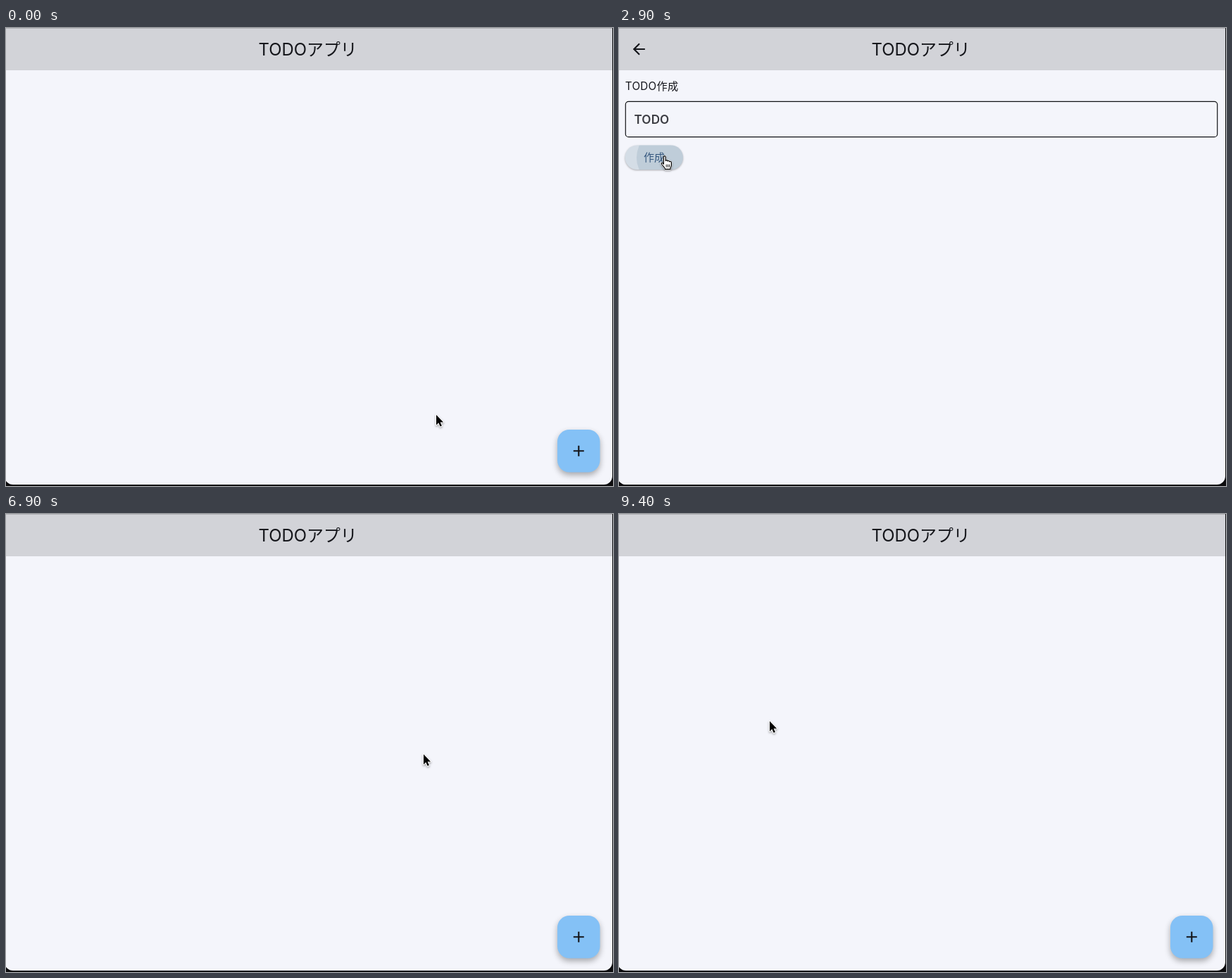
Write an HTML page with a canvas that moves like this. It is 862 px wide and 650 px high and loops after 10000 ms.

```html
<!DOCTYPE html>
<html lang="ja">
<head>
<meta charset="utf-8">
<title>TODOアプリ</title>
<style>
  html, body { margin: 0; width: 862px; height: 650px; overflow: hidden; background: #0c0c0e; }
  canvas { display: block; }
</style>
</head>
<body>
<canvas id="stage" width="862" height="650"></canvas>
<script>
const W = 862, H = 650, LOOP = 10000, STEP = 100;
const ctx = document.getElementById('stage').getContext('2d');
const FONT = 'Inter, "Noto Sans CJK JP", "Noto Sans CJK", sans-serif';
const BG = '#f4f5fb', BAR = '#d2d3d8', INK = '#15161b', ACCENT = '#36618e';

// x, y, width, height, corner radius
const FAB = [783, 570, 60.5, 60.5, 17];
const SUBMIT = [8.5, 166.5, 82.5, 34.5, 17.25];
const FIELD = [9.3, 104.3, 840.4, 50.4, 4.3];
const BACK = [9, 11, 38, 38, 19];

const ICON_BACK = new Path2D('M20 11H7.83l5.59-5.59L12 4l-8 8 8 8 1.41-1.41L7.83 13H20v-2z');
const ICON_PLUS = new Path2D('M19 13h-6v6h-2v-6H5v-2h6V5h2v6h6z');
const ARROW = new Path2D('M0 0V14.4L3.3 11.3L5.6 16.6L7.9 15.6L5.6 10.4H10.1Z');
const BEAM = new Path2D('M0 0Q4 0 4 3V15Q4 18 0 18M8 0Q4 0 4 3M8 18Q4 18 4 15');
const HAND = new Path2D('M4.4 12.2V2.2C4.4 .2 7.2 .2 7.2 2.2V7.3C8 6.2 9.9 6.6 10 7.9' +
  'C10.9 7 12.6 7.4 12.7 8.7C13.8 8 15.4 8.6 15.4 10V13.6C15.4 16 14 16.6 13.8 19.4H6.6' +
  'C6.4 17 3.4 15 1.6 12.2C.6 10.4 2.8 9.4 4.4 12.2Z');
const HAND_LINES = new Path2D('M8.2 12.6V16.6M10.4 12.6V16.6M12.6 12.6V16.6');

// pointer moves: start, end, x, y; it rests in between
const MOVES = [
  [0, 500, 818, 594], [900, 1100, 707, 566], [1100, 1300, 54, 210], [1400, 1600, 356, 301],
  [1600, 1900, 82, 190], [1900, 2700, 59, 181], [2900, 3400, 76, 132], [3400, 3600, 75, 160],
  [3700, 4100, 161, 87], [4700, 5300, 57, 167], [5800, 6500, 24, 28], [6500, 6900, 593, 341],
  [6900, 7500, 810, 595], [7650, 7800, 770, 583], [7800, 8000, 610, 480],
  [8100, 8700, 24, 28], [8800, 9400, 214, 294]
];
const CLICKS = [560, 2757, 5620, 7460];
const OPENS = [706, 7606], CLOSES = [6505, 8805];
const FOCUS = [3400, 5000], TYPING = 4400;

const clamp = v => Math.max(0, Math.min(1, v));
const lerp = (a, b, k) => a + (b - a) * k;
const hit = ([px, py], [x, y, w, h]) => px >= x && px <= x + w && py >= y && py <= y + h;

function bezier(a, b, c, d, s) {
  const r = 1 - s;
  return r * r * r * a + 3 * r * r * s * b + 3 * r * s * s * c + s * s * s * d;
}

// fast start, long settle: two cubics joined at (0.198, 0.541)
function settle(x) {
  if (x <= 0 || x >= 1) return clamp(x);
  const [px, py] = x < 0.198
    ? [[0, 0.056, 0.108, 0.198], [0, 0.024, 0.3085, 0.541]]
    : [[0.198, 0.3655, 0.5465, 1], [0.541, 1, 0.989, 1]];
  let lo = 0, hi = 1;
  for (let i = 0; i < 24; i++) {
    const mid = (lo + hi) / 2;
    if (bezier(...px, mid) < x) lo = mid; else hi = mid;
  }
  return bezier(...py, lo);
}

// 0 = list page, 1 = editor page
function pageShown(t) {
  const sum = (starts, len) => starts.reduce((s, a) => s + settle((t - a) / len), 0);
  return sum(OPENS, 500) - sum(CLOSES, 390);
}

function pointerAt(t) {
  let pos = [611, 549];
  for (const [start, end, x, y] of MOVES) {
    const k = clamp((t - start) / (end - start));
    pos = [lerp(pos[0], x, k), lerp(pos[1], y, k)];
  }
  return pos;
}

function box(rect) {
  ctx.beginPath();
  ctx.roundRect(...rect);
}

function text(str, x, y, size, color, weight = 400, spacing = 0) {
  ctx.font = `${weight} ${size}px ${FONT}`;
  ctx.letterSpacing = spacing + 'px';
  ctx.fillStyle = color;
  ctx.fillText(str, x, y);
}

function icon(path, cx, cy) {
  ctx.save();
  ctx.translate(cx, cy);
  ctx.scale(1.0714, 1.0714);
  ctx.translate(-12, -12);
  ctx.fillStyle = INK;
  ctx.fill(path);
  ctx.restore();
}

function shadow(color, blur, dy) {
  ctx.shadowColor = color;
  ctx.shadowBlur = blur;
  ctx.shadowOffsetY = dy;
}

// raised button with click ripples clipped to its shape
function raised(t, rect, fill, ...shade) {
  ctx.save();
  box(rect);
  ctx.save();
  shadow(...shade);
  ctx.fillStyle = fill;
  ctx.fill();
  ctx.restore();
  ctx.clip();
  for (const click of CLICKS) {
    const age = t - click, at = pointerAt(click);
    if (age <= 0 || age > 600 || !hit(at, rect)) continue;
    ctx.fillStyle = `rgba(100,135,160,${0.19 * clamp((600 - age) / 300)})`;
    ctx.beginPath();
    ctx.arc(at[0] + 6, at[1] + 3, age * 0.28, 0, 7);
    ctx.fill();
  }
  ctx.restore();
}

function frame() {
  ctx.fillStyle = BG;
  ctx.fillRect(0, 0, W, H);
  ctx.fillStyle = BAR;
  ctx.fillRect(0, 0, W, 60);
  text('TODOアプリ', 358.5, 39, 23.9, INK);
}

function home(t, over) {
  frame();
  raised(t, FAB, over === FAB ? '#7bb6ea' : '#84c1f6', 'rgba(0,0,0,.32)', 8, 4);
  icon(ICON_PLUS, 813.3, 600.3);
}

function editor(t, over) {
  frame();
  if (over === BACK) {
    ctx.fillStyle = 'rgba(30,32,40,.09)';
    box(BACK);
    ctx.fill();
  }
  icon(ICON_BACK, 28.3, 30);
  text('TODO作成', 8.8, 87.5, 15.2, INK, 400, 0.3);

  const focus = t >= FOCUS[0] && t < FOCUS[1];
  ctx.strokeStyle = focus ? ACCENT : '#111216';
  ctx.lineWidth = focus ? 2.1 : 1.2;
  box(FIELD);
  ctx.stroke();

  const typed = t < OPENS[1] ? 'k'.repeat(2 * clamp(Math.floor((t - TYPING) / STEP + 1) / 2)) : '';
  if (typed) text(typed, 21.3, 136, 17.14, INK, 400, 0.5);
  else text('TODO', 21.5, 136, 17.14, '#3c3d43', 600, 0.1);
  if (focus) {
    ctx.fillStyle = ACCENT;
    ctx.fillRect(21.3 + typed.length * 10.2, 120, 2, 21);
  }
  raised(t, SUBMIT, over === SUBMIT ? '#d4dde6' : '#ecedf7', 'rgba(0,0,0,.3)', 2.5, 1);
  text('作成', 34.9, 189, 15, '#36587f', 500, 0.1);
}

function pointer([x, y], over) {
  ctx.save();
  ctx.translate(x, y);
  ctx.lineJoin = 'round';
  ctx.strokeStyle = '#000';
  ctx.lineWidth = 1.2;
  if (over === FIELD) {
    ctx.stroke(BEAM);
  } else {
    const shape = over ? HAND : ARROW;
    ctx.save();
    shadow('rgba(0,0,0,.35)', 3, 1.5);
    ctx.strokeStyle = '#fff';
    ctx.lineWidth = 2;
    ctx.stroke(shape);
    ctx.restore();
    ctx.fillStyle = over ? '#fff' : '#000';
    ctx.fill(shape);
    if (over) {
      ctx.stroke(HAND);
      ctx.lineWidth = 0.9;
      ctx.stroke(HAND_LINES);
    }
  }
  ctx.restore();
}

function draw(t) {
  const p = pageShown(t), pos = pointerAt(t);
  const targets = p < 0.01 ? [FAB] : p > 0.98 ? [SUBMIT, FIELD, BACK] : [];
  const over = targets.find(r => hit(pos, r));

  ctx.fillStyle = '#0c0c0e';
  ctx.fillRect(0, 0, W, H);
  ctx.save();
  box([-2, -20, 863, 668, 12]);
  ctx.clip();

  // the first page trails at a third of the speed
  ctx.save();
  ctx.translate(-W / 3 * p, 0);
  home(t, over);
  ctx.restore();

  if (p > 0) {
    ctx.save();
    ctx.translate(W * (1 - p), 0);
    const edge = ctx.createLinearGradient(-43, 0, 0, 0);
    edge.addColorStop(0, 'rgba(0,60,60,0)');
    edge.addColorStop(1, 'rgba(0,60,60,.022)');
    ctx.fillStyle = edge;
    ctx.fillRect(-43, 0, 43, H);
    editor(t, over);
    ctx.restore();
  }
  ctx.fillStyle = '#b1b2b6';
  ctx.fillRect(0, 0, W, 1);
  ctx.restore();
  pointer(pos, over);
}

const began = performance.now();
function tick() {
  const t = (performance.now() - began) % LOOP;
  draw(Math.floor(t / STEP) * STEP);
  requestAnimationFrame(tick);
}
tick();
</script>
</body>
</html>
```
